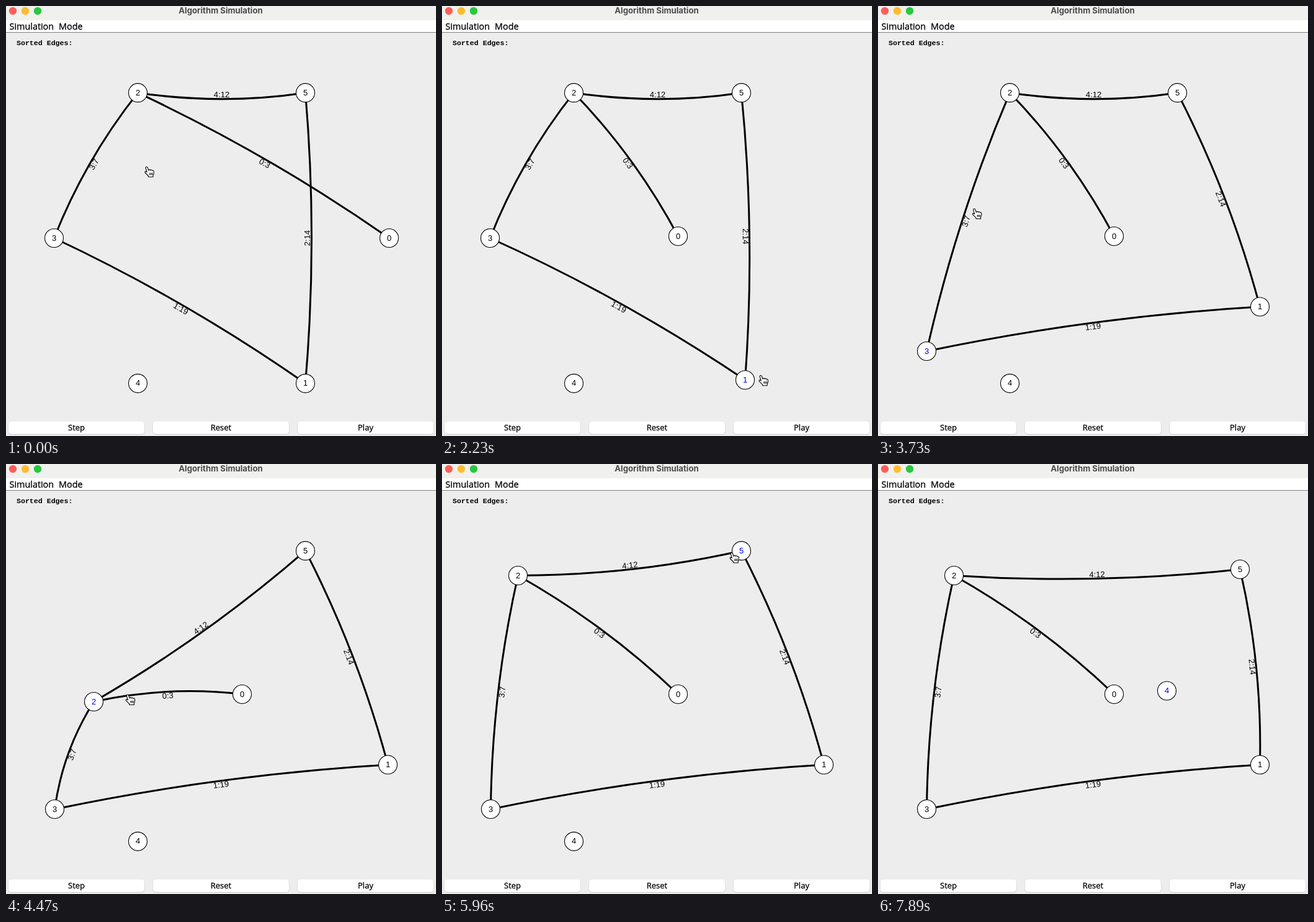
Recreate the animation shown at these times as an HTML page. Size 693x692 px, loop 8 s.

```html
<!DOCTYPE html>
<html lang="en">
<head>
<meta charset="utf-8">
<title>Algorithm Simulation</title>
<style>
  html, body { margin: 0; width: 100%; height: 100%; overflow: hidden; background: #ededed; }
  svg { display: block; width: 693px; height: 692px; }
  .title { font: 700 13.2px Inter, sans-serif; fill: #4b4b4b; }
  .menu { font: 14.4px "Open Sans", "Noto Sans", sans-serif; }
  .button { font: 13px "Open Sans", "Noto Sans", sans-serif; }
  .menu, .button { stroke: #000; stroke-width: .3px; }
  .mono { font: bold 11.6px "Liberation Mono", monospace; }
  .graph { font: 13px "Liberation Sans", Arial, sans-serif; }
  .title, .button, .graph { text-anchor: middle; }
</style>
</head>
<body>
<svg viewBox="0 0 693 692">
  <rect width="693" height="692" fill="#ededed"/>
  <rect width="693" height="23" fill="#f0f0ef"/>
  <rect y="23" width="693" height="19" fill="#fff"/>
  <rect y="42" width="693" height="1" fill="#808080"/>
  <circle cx="11" cy="8" r="6.2" fill="#fe5f57"/>
  <circle cx="31" cy="8" r="6.2" fill="#febc2e"/>
  <circle cx="51" cy="8" r="6.2" fill="#28c840"/>
  <text class="title" x="346" y="12">Algorithm Simulation</text>
  <text class="menu" x="5.5" y="38">Simulation</text>
  <text class="menu" x="85" y="38">Mode</text>
  <text class="mono" x="17" y="63">Sorted Edges:</text>
  <g id="buttons"></g>
  <g class="graph" transform="translate(.5 .5)">
    <g id="edges"></g>
    <g id="nodes"></g>
  </g>
  <g id="cursor" fill="#fff" stroke="#000" stroke-width="1.1" stroke-linejoin="round">
    <path d="M-6-6.5C-6-8.5-3.5-9-2.8-7L-1.2-2.6C-.5-4 1.5-4 2-2.6C3-3.7 4.6-3.2 4.8-2C6-2.6 7.2-1.8 7.3-.5C7.5 2 7 4 6 5.5V8H-1.5V6.5L-6.5 1.5C-8 0-6.5-1.5-5-.5L-3.8.4Z"/>
    <path d="M.8 1.5V5M2.8 1.5V5M4.8 1.5V5"/>
  </g>
</svg>
<script>
const LOOP = 8000, STEP = 148.9, LEAD = 8;
const RADIUS = 15, BEND = 20, LABEL_OFFSET = 3.5;
const LAG = 0.7;          // steps by which a dragged node trails the cursor
const CURSOR_GONE = 53;   // step at which the cursor is hidden
const $ = id => document.getElementById(id);

function add(parent, tag, attrs, text = '') {
  const el = document.createElementNS('http://www.w3.org/2000/svg', tag);
  for (const name in attrs) el.setAttribute(name, attrs[name]);
  el.textContent = text;
  return parent.appendChild(el);
}

// Nodes start on a hexagon; `slot` is each node's corner, clockwise from the right.
const home = [0, 1, 4, 3, 2, 5].map(slot => {
  const angle = slot * Math.PI / 3;
  return [347 + 270 * Math.cos(angle), 373 + 270 * Math.sin(angle)];
});

// Each drag takes a node to a point; `grip` is the cursor's offset from the node.
const drags = [
  { node: 0, start: 7, end: 11, to: [380, 370], grip: [7, 15] },
  { node: 1, start: 13.7, end: 17.7, to: [615, 483.5], grip: [8, 22] },
  { node: 3, start: 21, end: 22.8, to: [78, 555], grip: [5, 10] },
  { node: 2, start: 27, end: 29.3, to: [141, 382], grip: [11, 4] },
  { node: 2, start: 29.3, end: 31.5, to: [380, 350], grip: [11, 4] },
  { node: 2, start: 31.5, end: 35, to: [122, 179], grip: [11, 4] },
  { node: 5, start: 39.3, end: 43.3, to: [583, 169], grip: [-17, 10] },
  { node: 4, start: 47, end: 50.3, to: [465, 364.5], grip: [11, 4] }
];

const plus = (a, b) => [a[0] + b[0], a[1] + b[1]];
const mix = (a, b, f) => [a[0] + (b[0] - a[0]) * f, a[1] + (b[1] - a[1]) * f];
const easeInOut = u => u < .5 ? 2 * u * u : 1 - 2 * (1 - u) ** 2;

function progress(step, { start, end }) {
  const u = (step - start) / Math.max(end - start, .01);
  return easeInOut(Math.min(1, Math.max(0, u)));
}

const follow = (moves, from, step) =>
  moves.reduce((point, move) => mix(point, move.to, progress(step, move)), from);

// The cursor glides to each node, then carries it.
const cursorMoves = drags.flatMap((drag, i) => {
  const glide = {
    start: i ? drags[i - 1].end : 0,
    end: drag.start,
    to: plus(nodeAt(drag.node, drag.start), drag.grip)
  };
  return [glide, { ...drag, to: plus(drag.to, drag.grip) }];
});

function nodeAt(node, step) {
  return follow(drags.filter(drag => drag.node === node), home[node], step);
}

['Step', 'Reset', 'Play'].forEach((name, i) => {
  const x = 3.5 + i * 233;
  add($('buttons'), 'rect', { x, y: 669, width: 220, height: 21, rx: 5, fill: '#d0d0d0' });
  add($('buttons'), 'rect', { x: x + .5, y: 668.8, width: 219, height: 20, rx: 4.5, fill: '#fff' });
  add($('buttons'), 'text', { x: x + 110, y: 683, class: 'button' }, name);
});

const edges = [[0, 2, 3], [1, 3, 19], [1, 5, 14], [2, 3, 7], [2, 5, 12]].map(([from, to, weight], i) => ({
  from, to,
  path: add($('edges'), 'path', { fill: 'none', stroke: '#000', 'stroke-width': 3 }),
  label: add($('edges'), 'text', { y: 4.2 }, `${i}:${weight}`)
}));

const nodes = home.map((_, i) => {
  const group = add($('nodes'), 'g', {});
  add(group, 'circle', { r: RADIUS, fill: '#fff', stroke: '#000', 'stroke-width': 1.1 });
  return { group, text: add(group, 'text', { y: 4 }, i) };
});

function drawEdge({ from, to, path, label }, points) {
  const [x0, y0] = points[from], [x1, y1] = points[to];
  const dx = x1 - x0, dy = y1 - y0, length = Math.hypot(dx, dy);
  const offset = d => [(x0 + x1) / 2 - dy / length * d, (y0 + y1) / 2 + dx / length * d];
  const flip = dx < -.01 ? 180 : 0;
  const angle = Math.atan2(dy, dx) * 180 / Math.PI + flip;
  path.setAttribute('d', `M${x0} ${y0}Q${offset(BEND)} ${x1} ${y1}`);
  label.setAttribute('transform', `translate(${offset(LABEL_OFFSET)}) rotate(${angle})`);
}

function render(time) {
  const step = Math.floor((time % LOOP + LEAD) / STEP);
  const points = nodes.map((_, i) => nodeAt(i, step - LAG));
  const selected = drags.filter(drag => drag.start <= step - LAG).pop()?.node;
  nodes.forEach(({ group, text }, i) => {
    group.setAttribute('transform', `translate(${points[i]})`);
    text.setAttribute('fill', i === selected ? '#00f' : '#000');
  });
  edges.forEach(edge => drawEdge(edge, points));
  $('cursor').setAttribute('transform', `translate(${follow(cursorMoves, [231, 267], step)})`);
  $('cursor').setAttribute('visibility', step < CURSOR_GONE ? 'visible' : 'hidden');
}

const start = performance.now();
function tick() {
  render(performance.now() - start);
  requestAnimationFrame(tick);
}
tick();
</script>
</body>
</html>
```
